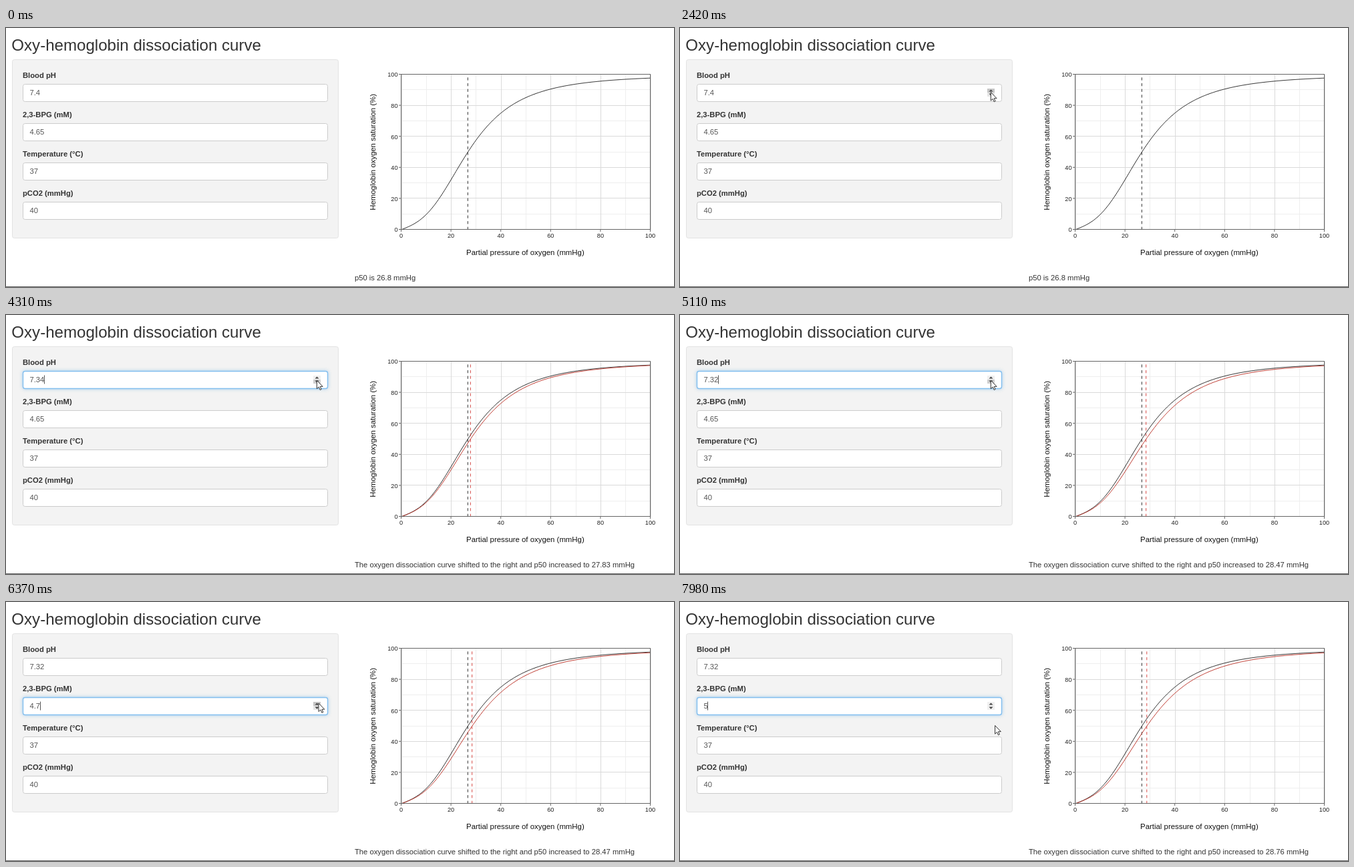
Animation, 1000 px wide and 389 px high, one loop 8 s. Source, as an HTML page with a canvas:

```html
<!DOCTYPE html>
<html lang="en">
<head>
<meta charset="utf-8">
<title>Oxy-hemoglobin dissociation curve</title>
<style>
html, body { margin: 0; width: 100%; height: 100%; overflow: hidden; background: #fff; }
canvas { display: block; width: 1000px; height: 389px; }
</style>
</head>
<body>
<canvas id="stage"></canvas>
<script>
const LOOP = 8000, W = 1000, H = 389;
const FONT = '"Liberation Sans", Arial, sans-serif';
const BASE_P50 = 26.765;
const LAG = 370; // delay between an input change and the new plot

const phClicks = [2850, 3150, 3420, 3650, 3920, 4190, 4440, 4700];
const bpgClicks = Array.from({ length: 7 }, (_, i) => 6270 + i * 190);

// time, x, y of the pointer tip
const pointerPath = [
  [500, 560, 205], [820, 486.5, 129.3], [1740, 486.5, 129.3],
  [2160, 465.3, 96.5], [2600, 465.3, 96.5], [2750, 465.3, 98.2],
  [5500, 465.3, 98.2], [6080, 468, 152], [7450, 468, 152],
  [7860, 471.6, 185.5]
];

const plot = { x: 591.5, y: 70, w: 373, h: 233 };
const px = v => plot.x + plot.w * v / 100;
const py = v => plot.y + plot.h * (1 - v / 100);

const canvas = document.getElementById('stage');
const dpr = window.devicePixelRatio || 1;
canvas.width = W * dpr;
canvas.height = H * dpr;
const ctx = canvas.getContext('2d');

const countBefore = (times, t) => times.filter(c => c <= t).length;
const phAt = t => 7.4 - 0.01 * countBefore(phClicks, t);
const bpgAt = t => 4.65 + 0.05 * countBefore(bpgClicks, t);
const short = v => String(Number(v.toFixed(2)));

function p50At(t) {
  const ph = BASE_P50 - 21.279 * (phAt(t) - 7.4);
  const bpg = BASE_P50 + 0.79563 * (bpgAt(t) - 4.65);
  return ph * bpg / BASE_P50;
}

// Severinghaus equation, scaled to the given p50
function saturation(p, p50) {
  const q = p * 26.86 / p50;
  const s = q * q * q + 150 * q;
  return 100 * s / (s + 23400);
}

function pointerAt(t) {
  if (t < pointerPath[0][0]) return null;
  for (let i = 1; i < pointerPath.length; i++) {
    const [t0, x0, y0] = pointerPath[i - 1], [t1, x1, y1] = pointerPath[i];
    if (t < t1) {
      const u = (t - t0) / (t1 - t0), k = u * u * (3 - 2 * u);
      return { x: x0 + (x1 - x0) * k, y: y0 + (y1 - y0) * k };
    }
  }
  const [, x, y] = pointerPath[pointerPath.length - 1];
  return { x, y };
}

function text(str, x, y, size, color, align = 'left', weight = '') {
  ctx.font = `${weight} ${size}px ${FONT}`;
  ctx.fillStyle = color;
  ctx.textAlign = align;
  ctx.fillText(str, x, y);
}

function line(x0, y0, x1, y1, color, width = 1) {
  ctx.strokeStyle = color;
  ctx.lineWidth = width;
  ctx.beginPath();
  ctx.moveTo(x0, y0);
  ctx.lineTo(x1, y1);
  ctx.stroke();
}

function shape(points, fill) {
  ctx.beginPath();
  points.forEach(([x, y]) => ctx.lineTo(x, y));
  ctx.closePath();
  ctx.fillStyle = fill;
  ctx.fill();
}

function box(x, y, w, h, r, fill, stroke, width = 1) {
  ctx.beginPath();
  ctx.roundRect(x, y, w, h, r);
  ctx.fillStyle = fill;
  ctx.fill();
  ctx.strokeStyle = stroke;
  ctx.lineWidth = width;
  ctx.stroke();
}

function spinner(cy, pointer) {
  const over = pointer && pointer.x > 459.5 && pointer.x < 471.5 && Math.abs(pointer.y - cy) < 6;
  const upper = over && pointer.y < cy + 0.5;
  ctx.fillStyle = upper ? '#c6c6c6' : '#f0f0f0';
  ctx.fillRect(460, cy - 6, 11, 6);
  ctx.fillStyle = upper ? '#e6e6e6' : over ? '#cfcfcf' : '#f0f0f0';
  ctx.fillRect(460, cy, 11, 6);
  const x = 465.5;
  shape([[x - 3, cy - 1.5], [x, cy - 4.6], [x + 3, cy - 1.5]], '#444');
  shape([[x - 3, cy + 1.6], [x, cy + 4.7], [x + 3, cy + 1.6]], '#444');
}

function field(row, label, value, focused, pointer) {
  const cy = 97 + row * 59.1, top = Math.round(cy - 13.5) + 0.5;
  text(label, 25, Math.round(cy - 22), 11.24, '#333', 'left', 'bold');
  if (focused) {
    ctx.save();
    ctx.shadowColor = 'rgba(102,175,233,0.5)';
    ctx.shadowBlur = 5 * dpr;
    box(25.5, top, 456, 26, 3, '#fff', '#8cc3ee');
    ctx.restore();
    box(25.5, top, 456, 26, 3, '#fff', '#84bfee', 1.4);
  } else {
    box(25.5, top, 456, 26, 3, '#fff', '#ccc');
  }
  text(value, 35.5, Math.round(cy + 4), 11.24, '#555');
  if (focused) {
    const x = Math.floor(35.5 + ctx.measureText(value).width) + 0.5;
    line(x, cy - 6.5, x, cy + 6.5, '#555');
  }
  const hover = pointer && pointer.x > 25 && pointer.x < 482 && Math.abs(pointer.y - cy) < 13;
  if (focused || hover) spinner(Math.round(cy), pointer);
}

function curve(p50, color, dashColor) {
  ctx.strokeStyle = color;
  ctx.lineWidth = 1;
  ctx.beginPath();
  for (let p = 0; p <= 100; p += 0.5) ctx.lineTo(px(p), py(saturation(p, p50)));
  ctx.stroke();
  ctx.setLineDash([4.3, 4.33]);
  line(px(p50), py(0), px(p50), py(100), dashColor);
  ctx.setLineDash([]);
}

function chart(p50) {
  for (const [start, color] of [[10, '#eeeeee'], [0, '#dadada']]) {
    for (let v = start; v <= 100; v += 20) {
      const x = Math.round(px(v)) + 0.5, y = Math.round(py(v)) - 0.5;
      line(x, py(0), x, py(100), color);
      line(px(0), y, px(100), y, color);
    }
  }
  curve(BASE_P50, '#2c2c2c', '#333');
  if (p50 > BASE_P50 + 0.001) curve(p50, '#bf3a30', '#d84a46');

  ctx.strokeStyle = '#666';
  ctx.lineWidth = 1;
  ctx.strokeRect(591.5, 69.5, 373, 233);
  for (let v = 0; v <= 100; v += 20) {
    const x = px(v), y = py(v);
    line(x, 303, x, 306, '#666');
    line(588, y - 0.5, 591, y - 0.5, '#666');
    text(v, x, 315, 9.2, '#222', 'center');
    text(v, 586.5, y + 3.3, 9.2, '#222', 'right');
  }
  text('Partial pressure of oxygen (mmHg)', 777.4, 341, 11.4, '#111', 'center');
  ctx.save();
  ctx.translate(553, 186.4);
  ctx.rotate(-Math.PI / 2);
  text('Hemoglobin oxygen saturation (%)', 0, 0, 11.4, '#111', 'center');
  ctx.restore();
}

function arrow({ x, y }) {
  ctx.save();
  ctx.translate(x, y);
  shape([[0, 0], [0, 12.6], [2.9, 9.9], [4.9, 14.3], [6.8, 13.4], [4.9, 9.2], [8.8, 9.2]], '#fff');
  ctx.strokeStyle = '#333';
  ctx.lineWidth = 1;
  ctx.stroke();
  ctx.restore();
}

function draw(t) {
  const pointer = pointerAt(t);
  const p50 = p50At(t - LAG);
  const onBpg = t >= bpgClicks[0], onPh = !onBpg && t >= phClicks[0];

  ctx.setTransform(dpr, 0, 0, dpr, 0, 0);
  ctx.fillStyle = '#fff';
  ctx.fillRect(0, 0, W, H);

  text('Oxy-hemoglobin dissociation curve', 8.3, 34, 24.1, '#333');
  box(9.5, 47.5, 488, 268, 3, '#f3f3f3', '#e3e3e3');
  field(0, 'Blood pH', short(phAt(t)), onPh, pointer);
  field(1, '2,3-BPG (mM)', short(bpgAt(t)), onBpg, pointer);
  field(2, 'Temperature (°C)', '37', false, pointer);
  field(3, 'pCO2 (mmHg)', '40', false, pointer);

  chart(p50);
  const message = p50 > BASE_P50 + 0.001
    ? `The oxygen dissociation curve shifted to the right and p50 increased to ${short(p50)} mmHg`
    : 'p50 is 26.8 mmHg';
  text(message, 522, 379, 11.24, '#333');

  ctx.fillStyle = '#666';
  ctx.fillRect(0, 388, W, 1);
  if (pointer) arrow(pointer);
}

const start = performance.now();
function tick() {
  draw((performance.now() - start) % LOOP);
  requestAnimationFrame(tick);
}
tick();
</script>
</body>
</html>
```
